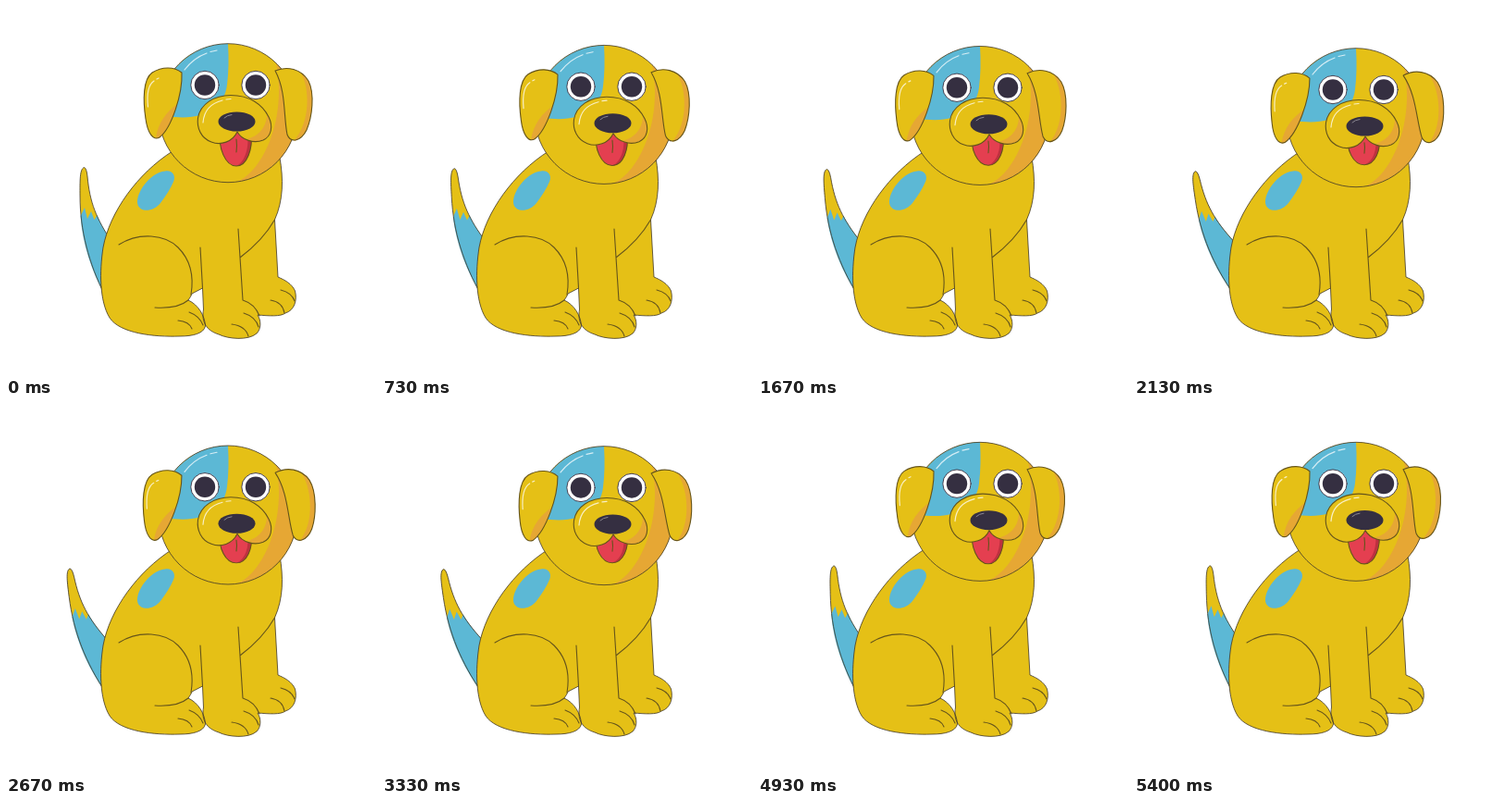
Recreate the animation shown at these times as an HTML page. Size 400 by 400 pixels, loop 5470 ms.

```html
<!DOCTYPE html>
<html lang="en">
<head>
<meta charset="utf-8">
<title>Puppy</title>
<style>
  html, body { margin: 0; width: 100%; height: 100%; overflow: hidden; background: #fff; }
  svg { display: block; width: 100vw; height: 100vh; }
  path, circle, ellipse { stroke-linecap: round; stroke-linejoin: round; }
  .skin { fill: #e5c016; }
  .edge { fill: none; stroke: #40382a; stroke-width: .8; }
  .line { fill: none; stroke: #65541b; stroke-width: 1.1; }
  .blue { fill: #5cb8d5; }
  .shade { fill: #e6a734; }
  .shine { fill: none; stroke: #fff; stroke-width: 1.2; opacity: .75; }
  .dark { fill: #352f41; }
  .rim { fill: none; stroke: #352f41; stroke-width: .9; }
</style>
</head>
<body>
<svg viewBox="0 0 400 400">
  <defs>
    <clipPath id="lids"><ellipse class="lid" rx="15.200" ry="15.200"/></clipPath>
    <path id="tailShape" d="M106 312C89 278 79.500 243 79.500 205C79.500 190 79 176 84 174.500Q86.500 175 87.500 184C90 212 97 230 114 255"/>
    <path id="muzzleShape" d="M250 136C245 147 232 151 222 147C211 143 206 132 207.500 121C210 106 225 96.500 243 96.500
      C263 96.500 277 106 284 120C289 130 287 141 278 145C268 149 255 145 250 136Z"/>
    <path id="earShapeL" d="M190 72C182 65.500 169 65 158 72C148 79 148 102 151 122C153 137 159 146 166 142C179 132 191 95 190 72Z"/>
    <path id="earShapeR" d="M291 70C304 64.500 319 68 327 81C334 95 331 120 325 134C319 146 308 149 304 139C300 120 303 92 291 70Z"/>
    <g id="eye">
      <g clip-path="url(#lids)"><circle fill="#fff" r="16"/><circle class="dark" r="11.200"/></g>
      <ellipse class="lid rim" rx="15.200" ry="15.200"/>
    </g>
  </defs>

  <g id="tail">
    <use href="#tailShape" class="skin"/>
    <path class="blue" d="M80 227L84.500 218L87.500 230L91.500 222L95 231L98 226Q103 239 114 255L106 312C92 287 82 256 80 227Z"/>
    <use href="#tailShape" class="edge"/>
  </g>

  <path class="skin edge" style="fill:#e5c016" d="M180 157C142 181 112 223 105 261C101 287 101 319 112 337C123 354 160 358 188 357C202 357 214 354 215.500 346
    C215 335 208 323 197 318Q200 314 201 311L212.500 305L213.500 328C211 342 217 351 230 355C240 360 262 362 271 354C276 349 276 340 272 334
    C284 335 297 336 302 332C312 329 315 318 312.500 308C309 300 301 296 294 293L290.500 231C300 210 300 187 296 164Z"/>
  <path class="blue" d="M172 178.500C180 177 184 184 181 190C178 197 173 205 167 213C160 222 146 224 142.500 215C139 204 155 180 172 178.500Z"/>
  <path class="line" d="M122 258C144 244 172 247 186 261C200 275 203 294 200 312M161 326C177 327 190 324 197 318
    M198 331Q209 335 213 345M186 340Q198 341 201 349
    M210 261L212.500 305M251 241L256 318Q269 322 274 335M253 272Q278 253 290.500 231
    M257 332Q270 336 273 347M244 344Q259 346 262 357M297 307Q309 310 312 319M286 318Q299 320 301 332"/>

  <g id="head">
    <circle class="skin" cx="240" cy="115.700" r="75"/>
    <path class="blue" d="M240 40.700A75 75 0 0 0 165.500 119L182 120C215 123 236 110 239 85Q241.500 65 240 40.700Z"/>
    <path class="shade" d="M292 61.700A75 75 0 0 1 250 190C278 178 304 122 292 61.700Z"/>
    <circle class="edge" cx="240" cy="115.700" r="75"/>
    <path class="shine" d="M193 69Q203 56 217 51M221 49.500L228 48"/>

    <use href="#eye" x="215" y="85.500"/>
    <use href="#eye" x="270" y="85.500"/>

    <g id="tongue">
      <path fill="#e43f50" d="M232 136C229 153 237 173 249 173C261 173 267 154 265 136Z"/>
      <path fill="#bd303f" d="M265 136C267 154 261 173 249 173C259 168 263 153 261 136Z"/>
      <path class="line" d="M232 136C229 153 237 173 249 173C261 173 267 154 265 136M249 144Q250 151 249 158"/>
    </g>
    <use href="#muzzleShape" class="skin"/>
    <path class="shade" d="M282 116.500Q283 118 284 120C289 130 287 141 278 145Q269 148 260 144C273 141 282 131 282 116.500Z"/>
    <use href="#muzzleShape" class="line"/>
    <path class="shine" d="M213 126C214 113 222 105 234 102M238 101L243 100.500"/>
    <ellipse class="dark" cx="249.500" cy="125" rx="20" ry="10.500"/>
    <path fill="none" stroke="#8b8792" d="M236 121Q239 118 244 117.500"/>

    <g id="earL">
      <use href="#earShapeL" class="skin"/>
      <path class="shade" d="M185 106C174 114 164 126 162 143Q164 143 166 142C175 134 181 120 185 106Z"/>
      <use href="#earShapeL" class="line"/>
      <path class="shine" d="M153.500 109C152 95 154 85 160 81M163 79L165 78"/>
    </g>
    <g id="earR">
      <use href="#earShapeR" class="skin"/>
      <path class="shade" d="M319 72.500C328 88 330 125 311 146Q320 144 325 134C331 120 334 95 327 81Q324 76 319 72.500Z"/>
      <use href="#earShapeR" class="line"/>
    </g>
  </g>
</svg>
<script>
  const LOOP = 82 / 15, FPS = 15, BOBS = 9, LOW = 0.52;
  const byId = id => document.getElementById(id);
  const move = (id, value) => byId(id).setAttribute('transform', value);
  const lids = document.querySelectorAll('.lid');

  // 0 at the top of a bob, 1 at the bottom
  function bob(t) {
    const p = t * BOBS / LOOP % 1;
    const turn = p < LOW ? p / LOW : (1 - p) / (1 - LOW);
    return (1 - Math.cos(Math.PI * turn)) / 2;
  }

  function lidScale(t) {
    const d = Math.abs(t - 4) / 0.2;
    return d < 1 ? 1 - 0.33 * (1 + Math.cos(Math.PI * d)) : 1;
  }

  function draw(t) {
    const k = bob(t), lid = lidScale(t);
    move('head', `translate(0 ${5 * k})`);
    move('tail', `translate(.5 0) rotate(${-8.2 * k} 104 303)`);
    move('earL', `translate(0 ${k}) rotate(${2 * k} 187 70)`);
    move('earR', `rotate(${-6 * k} 292 69)`);
    move('tongue', `translate(0 136) scale(1 ${1 - 0.17 * k}) translate(0 -136)`);
    lids.forEach(e => e.setAttribute('ry', 15.2 * lid));
  }

  const start = performance.now();
  function tick() {
    const t = (performance.now() - start + 4) / 1000 % LOOP;
    draw(Math.floor(t * FPS) / FPS);
    requestAnimationFrame(tick);
  }
  tick();
</script>
</body>
</html>
```
